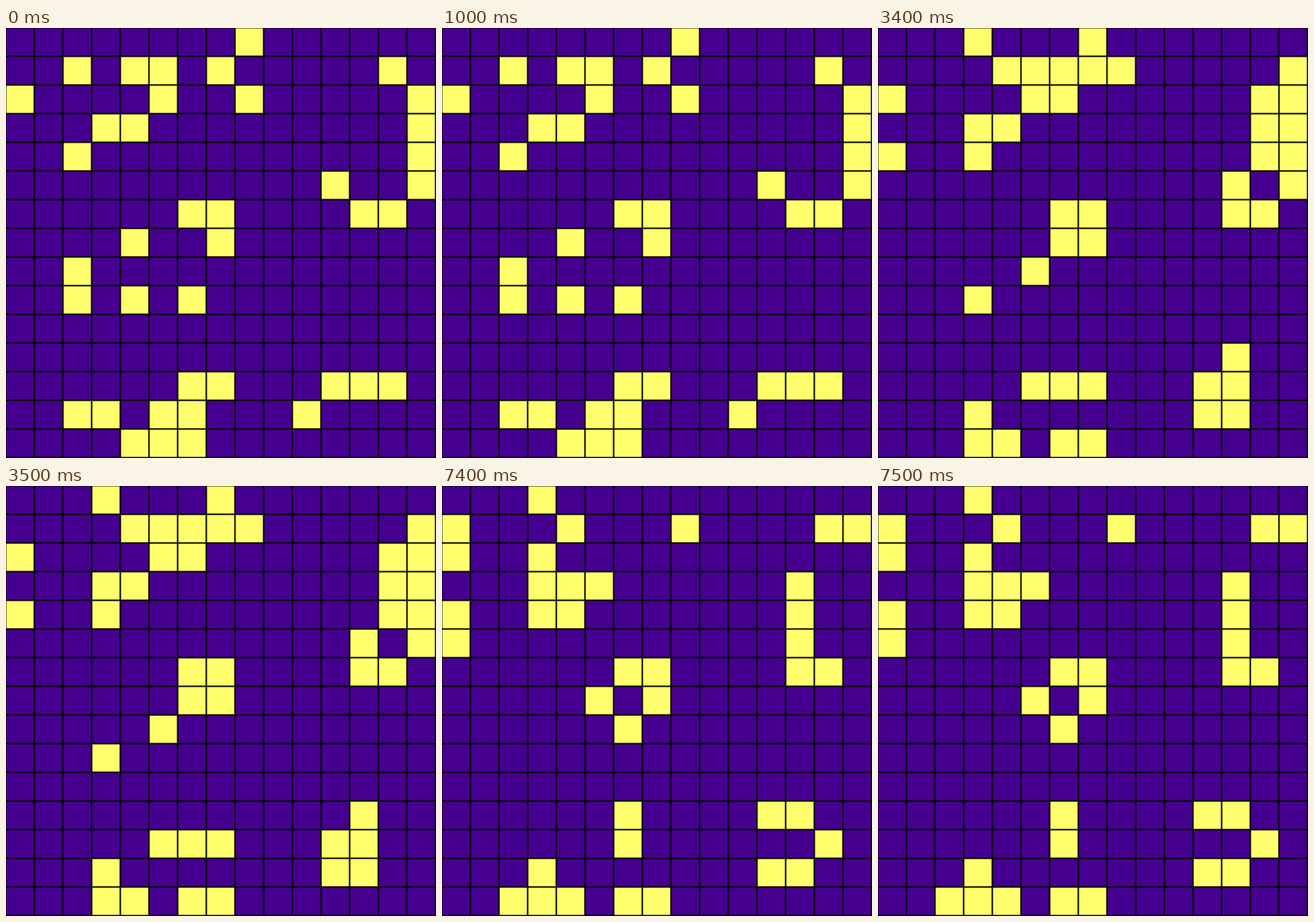
A matplotlib script that plays this animation: 600x600 px, repeating every 8000 ms.

```python
import numpy as np
import matplotlib.pyplot as plt
from matplotlib.animation import FuncAnimation
from matplotlib.colors import ListedColormap

SIZE, CELL, DPI = 600, 40, 100
STEP_MS, LEAD_MS, GEN_MS, LOOP_MS = 100, 600, 4000, 8000

SEED = """
........#......
..#.##.#.....#.
#....#..#.....#
...##.........#
..#...........#
...........#..#
......##....##.
....#..#.......
..#............
..#.#.#........
...............
...............
......##...###.
..##.##...#....
....###........
"""


def evolve(grid):
    """One Game of Life generation on a torus."""
    near = sum(np.roll(grid, (dy, dx), (0, 1))
               for dy in (-1, 0, 1) for dx in (-1, 0, 1)) - grid
    return ((near == 3) | ((grid == 1) & (near == 2))).astype(int)


generations = [np.array([[int(c == "#") for c in row] for row in SEED.split()])]
for _ in range((LOOP_MS - STEP_MS + LEAD_MS) // GEN_MS):
    generations.append(evolve(generations[-1]))

fig = plt.figure(figsize=(SIZE / DPI, SIZE / DPI), dpi=DPI)
ax = fig.add_axes([0, 0, 1, 1])
ax.axis("off")

board = ax.imshow(generations[0], cmap=ListedColormap(["#46008f", "#ffff6e"]),
                  vmin=0, vmax=1, extent=(0, SIZE, SIZE, 0),
                  interpolation="nearest", aspect="auto")

# Two-pixel rules centred half a pixel before each cell
edges = np.arange(0, SIZE + 1, CELL) - 0.5
rule = dict(colors="black", linewidths=2 * 72 / DPI, snap=False)
ax.vlines(edges, -2, SIZE + 2, **rule)
ax.hlines(edges, -2, SIZE + 2, **rule)
ax.set(xlim=(0, SIZE), ylim=(SIZE, 0))


def update(i):
    board.set_data(generations[(i * STEP_MS + LEAD_MS) // GEN_MS])
    return [board]


anim = FuncAnimation(fig, update, frames=LOOP_MS // STEP_MS,
                     interval=STEP_MS, repeat=True, repeat_delay=0)
plt.show()
```
